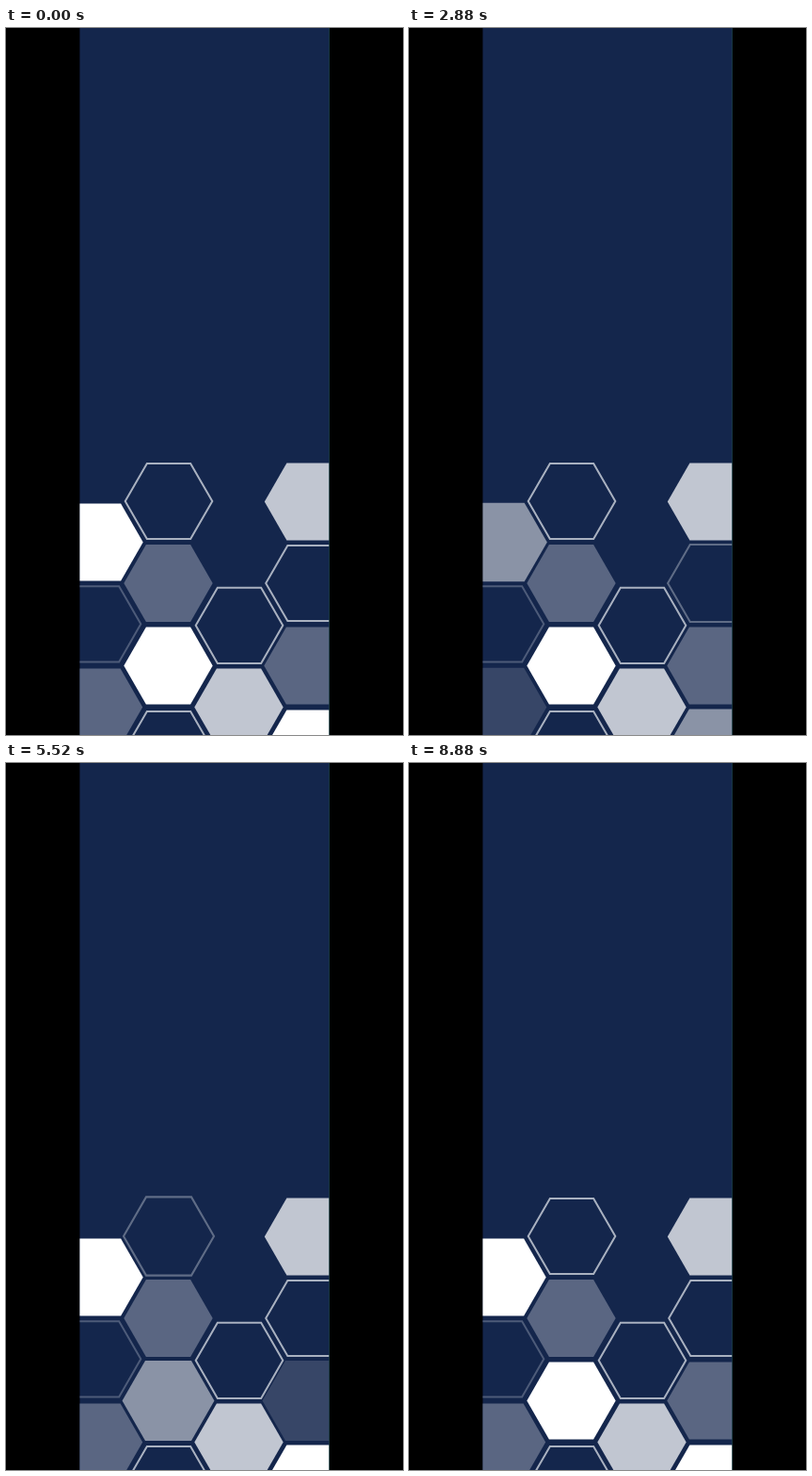
Recreate the animation shown at these times as an HTML page. Size 422 px wide and 750 px high, loop 9.04 s.

```html
<!DOCTYPE html>
<html lang="en">
<head>
<meta charset="utf-8">
<title>Pulsing hexagons</title>
<style>
  html, body { margin: 0; width: 100%; height: 100%; overflow: hidden; background: #000; }
  svg { display: block; width: 422px; height: 750px; }
</style>
</head>
<body>
<svg viewBox="0 0 422 750">
  <defs>
    <clipPath id="panel"><rect x="78.4" y="0" width="265.6" height="750"/></clipPath>
  </defs>
  <g clip-path="url(#panel)">
    <rect x="78" width="267" height="750" fill="#14264c"/>
    <g id="cells"></g>
    <rect x="343.2" width="1" height="750" fill="#173a40"/>
  </g>
</svg>
<script>
const LOOP = 9040, STEP = 80, PULSE = 1500;
const STARTS = [360, 2520, 4960, 7160];
const GROW = 0.05, FADE = 0.5;

const WHITE = '#fff', LIGHT = '#c1c6d1', GRAY = '#5a6682';
const LINE = '#a9b1c0', DIM = '#4d5b79';

// x, y, colour, outlined, pulse group
const CELLS = [
  [322, 502.5, LIGHT, false, 0],
  [97, 632.3, DIM, true, 0],
  [248, 633.8, LINE, true, 0],
  [173, 765, LINE, true, 0],
  [98.5, 545.5, WHITE, false, 1],
  [322.5, 589, LINE, true, 1],
  [98, 720.5, GRAY, false, 1],
  [322, 764.3, WHITE, false, 1],
  [173, 502, LINE, true, 2],
  [172.5, 676.5, WHITE, false, 2],
  [321.5, 676.5, GRAY, false, 2],
  [172.5, 589, GRAY, false, 3],
  [247.5, 720.5, LIGHT, false, 3]
];

function hexPoints(r) {
  return Array.from({ length: 6 }, (_, i) => {
    const a = i * Math.PI / 3;
    return (r * Math.cos(a)).toFixed(2) + ',' + (r * Math.sin(a)).toFixed(2);
  }).join(' ');
}

const layer = document.getElementById('cells');
const hexes = CELLS.map(([x, y, color, outlined, group]) => {
  const el = document.createElementNS('http://www.w3.org/2000/svg', 'polygon');
  el.setAttribute('points', hexPoints(outlined ? 46.3 : 47.2));
  el.setAttribute('fill', outlined ? 'none' : color);
  if (outlined) {
    el.setAttribute('stroke', color);
    el.setAttribute('stroke-width', 2);
  }
  layer.appendChild(el);
  return { el, x, y, group };
});

// Quick fade to half, hold, quick return; the size rises and falls evenly.
function pulse(p) {
  if (p <= 0 || p >= 1) return { scale: 1, opacity: 1 };
  const near = Math.min(p, 1 - p);
  return {
    scale: 1 + GROW * near * 2,
    opacity: 1 - FADE * Math.min(1, near / 0.2)
  };
}

function draw(time) {
  const t = Math.floor((time % LOOP) / STEP) * STEP;
  const states = STARTS.map(s => pulse((t - s) / PULSE));
  for (const { el, x, y, group } of hexes) {
    const { scale, opacity } = states[group];
    el.setAttribute('transform', `translate(${x} ${y}) scale(${scale})`);
    el.setAttribute('opacity', opacity);
  }
}

const begin = performance.now();
function tick() {
  draw(performance.now() - begin);
  requestAnimationFrame(tick);
}
tick();
</script>
</body>
</html>
```
